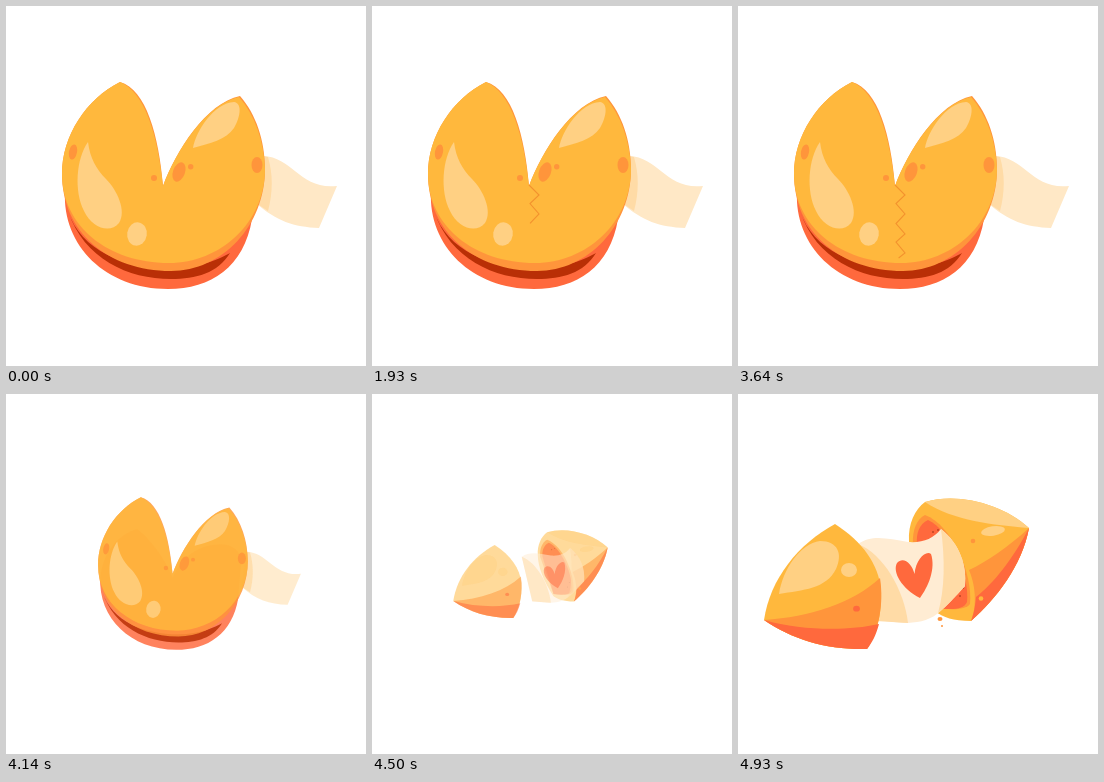
An HTML page with a canvas that plays this animation: 360 px wide and 360 px high, repeating every 5 s.

```html
<!DOCTYPE html>
<html lang="en">
<head>
<meta charset="utf-8">
<title>Fortune cookie</title>
<style>
  html, body { margin: 0; width: 100%; height: 100%; overflow: hidden; background: #fff; }
  canvas { display: block; width: 360px; height: 360px; }
</style>
</head>
<body>
<canvas id="stage" width="360" height="360"></canvas>
<script>
const ctx = document.getElementById('stage').getContext('2d');
const LOOP = 5000;
const YELLOW = '#ffb83d', ORANGE = '#ff953b', RED = '#ff693d', DARK = '#b92f06';
const SHINE = '#ffd083', PAPER = '#ffe8c6', SHADE = '#ffdba6';

const shape = (color, d) => ({ color, path: new Path2D(d) });
const oval = (color, x, y, rx, ry = rx, turn = 0) => {
  const path = new Path2D();
  path.ellipse(x, y, rx, ry, turn, 0, 7);
  return { color, path };
};

const whole = [
  shape(PAPER, 'M257 150C287 151 294 184 331 180L313 222C288 221 270 215 250 197Z'),
  shape(SHADE, 'M257 150L262 151C267 168 267 186 262 205L250 197Z'),
  shape(RED, 'M59 185C62 150 85 125 109 119C130 135 150 165 157 185C170 155 195 140 222 140C240 140 250 150 250 165L246 213C238 261 205 283 162 283C100 283 56 240 59 185Z'),
  shape(DARK, 'M62 205C75 245 118 262 165 262C195 262 215 252 224 247C212 267 190 273 165 273C122 273 78 253 62 205Z'),
  shape(ORANGE, 'M114 76C80 93 56 130 56 168C56 226 102 265 165 265C216 265 259 220 259 163C259 135 250 108 234 90C200 97 170 145 157 180C153 130 140 83 114 76Z'),
  shape(YELLOW, 'M114 76C80 93 56 130 56 168C56 220 102 257 163 257C214 257 259 217 259 163C258 135 249 109 233 91C200 98 170 145 157 180C152 130 139 86 114 76Z'),
  shape(SHINE, 'M82 136C70 153 68 185 78 205C86 222 104 228 113 217C121 205 111 184 100 173C90 163 84 152 82 136Z'),
  oval(SHINE, 131, 228, 9.8, 11.7, .15),
  shape(SHINE, 'M187 142C190 125 208 97 228 96C236 97 235 110 228 122C220 134 204 137 187 142Z'),
  oval(ORANGE, 67, 146, 4, 7.7, .2),
  oval(ORANGE, 148, 172, 3),
  oval(ORANGE, 173, 166, 6, 10, .35),
  oval(ORANGE, 184.7, 160.7, 2.7),
  oval(ORANGE, 251, 159, 5.5, 8)
];

const rightHalf = [
  shape(YELLOW, 'M187 108C220 98 265 110 291 134C284 172 258 205 233 227C215 227 205 223 198 218C180 190 171 165 171 147C170 130 177 115 187 108Z'),
  shape(SHINE, 'M187 108C220 98 265 110 291 134C255 131 216 127 187 108Z'),
  shape(ORANGE, 'M291 134C270 153 250 167 231 176C239 195 238 215 233 227C258 205 284 172 291 134Z'),
  shape(RED, 'M291 134C275 165 255 190 238 203C237 215 235 222 233 227C258 205 284 172 291 134Z'),
  shape(ORANGE, 'M187 121C179 125 174 136 175 150L198 214C213 216 228 216 232 210C235 180 214 131 187 121Z'),
  shape(RED, 'M190 126C181 130 178 140 179 150L198 214C213 216 226 216 229 208C232 182 212 136 190 126Z'),
  oval(SHINE, 255, 137, 12, 4.7, -.15),
  oval(ORANGE, 235, 147, 2.3),
  oval(YELLOW, 243, 204.5, 2.3),
  ...[[195, 138], [200, 136], [222, 202], [225, 194]].map(([x, y]) => oval('#7a1d04', x, y, .7))
];

const slip = [
  shape('#ffecd3', 'M120 150C135 140 150 145 170 148C185 149 195 145 203 135C222 150 229 172 227 192C217 203 208 213 199 220C190 227 178 229 165 229L138 226Z'),
  shape(SHADE, 'M120 150C145 160 166 195 170 229L138 227Z'),
  shape(SHADE, 'M203 135C207 165 207 195 200 219C209 212 217 203 227 192C229 172 222 150 203 135Z'),
  shape(RED, 'M182 204C164 195 154 178 159 169C165 162 174 169 176.500 180C178 165 188 156 193 160C198 175 190 193 182 204Z')
];

const leftHalf = [
  shape(YELLOW, 'M97 130C60 150 32 185 26 226C55 246 90 256 129 255C139 240 144 220 143 195C140 170 125 148 97 130Z'),
  shape(ORANGE, 'M26 226C72 223 115 209 142 184C146 210 141 236 129 255C90 256 55 246 26 226Z'),
  shape(RED, 'M26 226C65 237 110 237 141 230C138 241 134 249 129 255C90 256 55 246 26 226Z'),
  shape(SHINE, 'M41 200C45 175 62 150 82 147C100 147 105 160 98 175C88 195 65 196 41 200Z'),
  oval(SHINE, 111, 176, 8, 7),
  oval(RED, 118.5, 214.7, 3.4, 2.9)
];

const crumbs = [oval(ORANGE, 202, 225, 2.5, 2), oval(ORANGE, 204, 232, 1)];

const crackPoints = [[157, 179], [167, 189], [158, 197.5], [167, 208], [158, 217.5],
  [167, 228], [158, 236], [167, 247], [158, 254]];

function drawGroup(shapes, cx, cy, scale, alpha, shift = 0) {
  ctx.save();
  ctx.translate(cx, cy);
  ctx.scale(scale, scale);
  ctx.translate(shift - cx, -cy);
  ctx.globalAlpha = alpha;
  for (const { color, path } of shapes) {
    ctx.fillStyle = color;
    ctx.fill(path);
  }
  ctx.restore();
}

// One zigzag segment snaps open every 500 ms.
function drawCrack(t) {
  ctx.beginPath();
  ctx.moveTo(...crackPoints[0]);
  for (let i = 1; i < crackPoints.length; i++) {
    const p = Math.min(1, (t - 70 - (i - 1) * 500) / 400);
    if (p <= 0) break;
    const grown = p === 1 ? 1 : 1 - 2 ** (-10 * p);
    const [x0, y0] = crackPoints[i - 1], [x1, y1] = crackPoints[i];
    ctx.lineTo(x0 + (x1 - x0) * grown, y0 + (y1 - y0) * grown);
  }
  ctx.strokeStyle = '#f3922e';
  ctx.lineWidth = 1.1;
  ctx.stroke();
}

function keyed(t, keys) {
  if (t <= keys[0][0]) return keys[0][1];
  for (let i = 1; i < keys.length; i++) {
    const [t0, v0] = keys[i - 1], [t1, v1] = keys[i];
    if (t < t1) return v0 + (v1 - v0) * (t - t0) / (t1 - t0);
  }
  return keys[keys.length - 1][1];
}

// The slip starts tucked inside the right half and slides out while everything grows.
function drawHalves(t) {
  const scale = keyed(t, [[4230, 0], [4360, .434], [4710, .803], [4930, 1]]);
  const alpha = keyed(t, [[4230, 0], [4360, .24], [4710, .93], [4930, 1]]);
  const tuck = keyed(t, [[4360, 42], [4680, 0]]);
  const draw = (shapes, shift) => drawGroup(shapes, 158.5, 180.5, scale, alpha, shift);
  draw(rightHalf);
  draw(slip, tuck);
  draw(leftHalf);
  if (t > 4780) draw(crumbs);
}

function render(t) {
  ctx.clearRect(0, 0, 360, 360);
  const shrink = 1 - Math.min(1, Math.max(0, (t - 3640) / 700)) ** 4;
  if (shrink > 0) drawGroup(whole, 193.5, 179.5, shrink, shrink ** .6);
  if (t < 3700) drawCrack(t);
  if (t > 4230) drawHalves(t);
}

function tick(now) {
  render(now % LOOP);
  requestAnimationFrame(tick);
}
requestAnimationFrame(tick);
</script>
</body>
</html>
```
